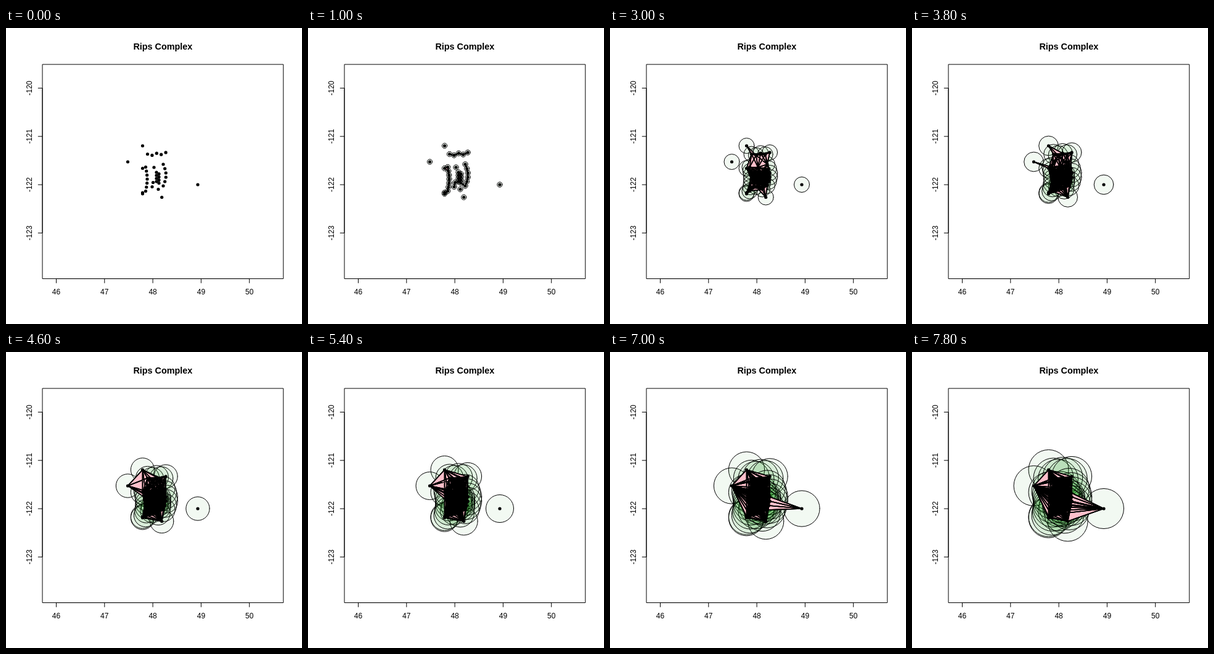
An HTML page with a canvas that plays this animation: 480 px wide and 480 px high, repeating every 8000 ms.

```html
<!DOCTYPE html>
<html lang="en">
<head>
<meta charset="utf-8">
<title>Rips Complex</title>
<style>
html, body { margin: 0; width: 480px; height: 480px; overflow: hidden; background: #fff; }
svg, canvas { position: absolute; left: 0; top: 0; }
text { font: 12px "Liberation Sans", Arial, sans-serif; text-anchor: middle; }
.title { font-size: 14.4px; font-weight: bold; }
path { fill: none; stroke: #000; }
</style>
</head>
<body>
<canvas id="plot" width="480" height="480"></canvas>
<svg id="axes" width="480" height="480">
  <path d="M59.04 59.04H449.76V406.56H59.04Z"/>
  <text class="title" x="254.4" y="35">Rips Complex</text>
</svg>
<script>
const STEP = 200, STEPS = 40, GROWTH = 0.833, UNIT = 78.3;
const LEFT = 59.04, BOTTOM = 406.56, TICK = 7.2;

const row = (count, place) => Array.from({ length: count }, (_, i) => place(i));
const zigzag = i => (i % 2 ? 1 : -1);

// Outliers and lone inner points, then the four strands of the cluster.
const points = [
  [221.5, 191], [197.5, 217], [221.5, 227.5], [221.5, 267], [221.5, 268.8], [252.7, 274.5],
  [311, 254], [240, 226], [238.5, 250.5], [237, 257.5], [247, 261.5],
  ...row(5, i => [229.5 + 7.4 * i, 205.8 - 0.65 * i + 1.3 * zigzag(i)]),
  ...row(6, i => [255 + 4.5 * Math.sin(Math.PI * i / 5), 221 + 7 * i]),
  ...row(7, i => [226.5 + 2.5 * Math.sin(Math.PI * i / 6), 225.5 + 6.5 * i]),
  ...row(8, i => [246 + 2 * zigzag(i), 234 + 2.5 * i])
];

function drawAxes() {
  const xs = row(5, i => 81.5 + UNIT * i);
  const ys = row(4, i => 97.5 + UNIT * i);
  const lines = `M${xs[0]} ${BOTTOM}H${xs[4]}M${LEFT} ${ys[0]}V${ys[3]}`
    + xs.map(x => `M${x} ${BOTTOM}v${TICK}`).join("")
    + ys.map(y => `M${LEFT} ${y}h${-TICK}`).join("");
  const labels = xs.map((x, i) => `<text x="${x}" y="432">${46 + i}</text>`).join("")
    + ys.map((y, i) => `<text transform="translate(42 ${y}) rotate(-90)">${-120 - i}</text>`).join("");
  document.getElementById("axes").innerHTML += `<path d="${lines}"/>` + labels;
}

const ctx = document.getElementById("plot").getContext("2d");
ctx.lineCap = ctx.lineJoin = "round";

function disc(x, y, r) {
  ctx.beginPath();
  ctx.arc(x, y, r, 0, 2 * Math.PI);
  ctx.fill();
}

function drawComplex(radius) {
  const near = (a, b) => Math.hypot(a[0] - b[0], a[1] - b[1]) <= 2 * radius;
  ctx.clearRect(0, 0, 480, 480);

  ctx.fillStyle = "rgba(0, 139, 0, 0.05)";
  ctx.lineWidth = 1;
  for (const [x, y] of points) {
    disc(x, y, radius);
    ctx.stroke();
  }

  // Pairs in reach become edges, mutually linked triples become triangles.
  const edges = new Path2D();
  ctx.fillStyle = "#ffc0cb";
  points.forEach((a, i) => {
    const linked = points.slice(i + 1).filter(p => near(a, p));
    linked.forEach((b, j) => {
      edges.moveTo(...a);
      edges.lineTo(...b);
      for (const c of linked.slice(j + 1)) {
        if (!near(b, c)) continue;
        ctx.beginPath();
        ctx.moveTo(...a);
        ctx.lineTo(...b);
        ctx.lineTo(...c);
        ctx.fill();
      }
    });
  });

  // Shared edges are overdrawn, which hardens their rims.
  ctx.lineWidth = 1.5;
  for (let pass = 0; pass < 3; pass++) ctx.stroke(edges);

  ctx.fillStyle = "#000";
  for (const [x, y] of points) disc(x, y, 2.6);
}

let shown = -1;
function tick() {
  const step = Math.floor(performance.now() / STEP) % STEPS;
  if (step !== shown) {
    shown = step;
    drawComplex(step < 3 ? 0 : step * GROWTH);
  }
  requestAnimationFrame(tick);
}

drawAxes();
tick();
</script>
</body>
</html>
```
